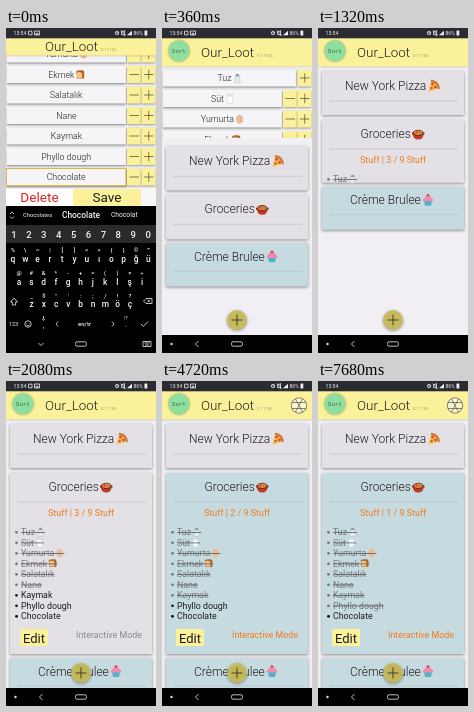
These frames come from a looping animation (150 px wide and 325 px high, 7.76 s). An HTML page:

```html
<!DOCTYPE html>
<html lang="en">
<head>
<meta charset="utf-8">
<title>Shopping list</title>
<style>
html, body { margin: 0; width: 100%; height: 100%; overflow: hidden; background: #f1eff3; }
svg { display: block; width: 100vw; height: 100vh; font-family: Roboto, sans-serif; }
text { fill: #1c1c1e; }
.mid { text-anchor: middle; }
.card { fill: #e3e1e6; filter: drop-shadow(0 1.3px 1.5px rgba(0,0,0,.42)); }
.blue { fill: #c6dbe0; }
.rule { stroke: #b9bbc0; stroke-width: .6; }
.name { font-size: 12px; font-weight: 300; }
.body { font-size: 8.8px; }
.hot { fill: #f07a1e; font-size: 9px; }
.light text { fill: #f4f4f4; }
.line { fill: none; stroke: #eee; stroke-width: .8; }
.yellow { fill: #fcf19b; }
.cell { fill: #f5f4f6; filter: drop-shadow(0 1px 1px rgba(0,0,0,.5)); }
#rows text, #title text { font-weight: 300; }

/* one shared clock: 1% = 77.6 ms */
.a { animation: 7.76s linear infinite; }
.done { fill: #77777c; }

#formClip { animation-name: formClip; }
@keyframes formClip {
  0%, .52% { height: 168px; }
  2.58% { height: 129px; animation-timing-function: ease-in-out; }
  8.8%, 100% { height: 0; }
}
#form { animation-name: form; }
@keyframes form {
  0%, .52% { transform: none; }
  2.58%, 100% { transform: translateY(65px); }
}
#cards { animation-name: cards; }
@keyframes cards {
  0%, .52% { transform: translateY(140px); }
  2.58% { transform: translateY(98px); animation-timing-function: ease-in-out; }
  8.8%, 100% { transform: none; }
}
#view { animation-name: view; }
@keyframes view {
  0%, 3.08% { height: 168px; }
  3.09%, 100% { height: 297px; }
}
#keys { animation-name: keys; }
@keyframes keys {
  0%, 2.06% { transform: none; }
  2.58% { transform: translateY(10px); animation-timing-function: ease-out; }
  5.67%, 100% { transform: translateY(150px); }
}
#head { animation-name: head; }
@keyframes head {
  0%, 3.08% { transform: translateY(-11px); }
  3.09%, 100% { transform: none; }
}
#title { animation-name: title; }
@keyframes title {
  0%, 3.08% { transform: translateY(-6px); }
  3.09%, 100% { transform: none; }
}
#sort { animation-name: sort; }
@keyframes sort {
  0%, 1.03% { opacity: 0; clip-path: inset(16px -3px -3px -3px); }
  2.3% { opacity: 1; }
  3.08% { clip-path: inset(16px -3px -3px -3px); }
  3.09%, 100% { opacity: 1; clip-path: inset(-3px -3px -3px -3px); }
}
#plus { animation-name: plus; }
@keyframes plus {
  0%, 1.03% { opacity: 0; transform: translateY(-127px); }
  2.3% { opacity: 1; transform: translateY(-127px); }
  3.08% { transform: translateY(-127px); }
  3.09%, 100% { opacity: 1; transform: none; }
}
.typing { animation-name: typing; }
@keyframes typing { 0%, 3.08% { opacity: 1; } 3.09%, 100% { opacity: 0; } }
.idle { animation-name: idle; }
@keyframes idle { 0%, 3.08% { opacity: 0; } 3.09%, 100% { opacity: 1; } }

.grow { animation-name: grow; }
@keyframes grow {
  0%, 16.5% { height: 44px; animation-timing-function: ease-out; }
  22.7%, 100% { height: 181px; }
}
#inside { animation-name: inside; }
@keyframes inside { 0%, 16.5% { opacity: 0; } 17%, 100% { opacity: 1; } }
#last { animation-name: last; }
@keyframes last {
  0%, 16.5% { transform: none; animation-timing-function: ease-out; }
  22.7%, 100% { transform: translateY(137px); }
}
#tint { animation-name: grow, tint; }
@keyframes tint {
  0%, 35.57% { fill: #e3e1e6; }
  44.8%, 100% { fill: #c6dbe0; }
}
#mode { animation-name: mode; }
@keyframes mode {
  0%, 35.57% { fill: #8b8b90; }
  44.8%, 100% { fill: #f07a1e; }
}
#badge { animation-name: badge; }
@keyframes badge { 0%, 35.57% { opacity: 0; } 41%, 100% { opacity: 1; } }

.ink6 { animation-name: ink6; }
@keyframes ink6 { 0%, 51% { fill: #1c1c1e; } 55%, 100% { fill: #77777c; } }
.ink7 { animation-name: ink7; }
@keyframes ink7 { 0%, 62.5% { fill: #1c1c1e; } 67%, 100% { fill: #77777c; } }
.cut6 { animation-name: cut6; }
@keyframes cut6 { 0%, 50.99% { opacity: 0; } 51%, 100% { opacity: 1; } }
.cut7 { animation-name: cut7; }
@keyframes cut7 { 0%, 62.49% { opacity: 0; } 62.5%, 100% { opacity: 1; } }
#left3 { animation-name: left3; }
@keyframes left3 { 0%, 50.99% { opacity: 1; } 51%, 100% { opacity: 0; } }
#left2 { animation-name: left2; }
@keyframes left2 { 0%, 50.99% { opacity: 0; } 51%, 62.49% { opacity: 1; } 62.5%, 100% { opacity: 0; } }

#blink { animation-name: blink; }
@keyframes blink {
  0%, 9.8% { opacity: 1; }
  13%, 20.5% { opacity: 0; }
  22.7%, 35.8% { opacity: 1; }
  38%, 46.5% { opacity: 0; }
  49%, 61.5% { opacity: 1; }
  64%, 72% { opacity: 0; }
  75%, 87.2% { opacity: 1; }
  89.6%, 100% { opacity: 0; }
}
</style>
</head>
<body>
<svg viewBox="0 0 150 325" preserveAspectRatio="none">
  <defs>
    <clipPath id="formBox"><rect id="formClip" class="a" y="10" width="150" height="168"/></clipPath>
    <clipPath id="viewBox"><rect id="view" class="a" y="10" width="150" height="168"/></clipPath>
    <clipPath id="bodyBox"><rect class="a grow" y="92" width="150" height="44"/></clipPath>
    <g id="pizza">
      <path d="M4 1Q10 2 12 9L1 12Z" fill="#f7bd4a"/>
      <path d="M3.600 .300Q11.500 1 12.600 9.300L10.800 9.600Q9.500 3.500 3.300 2.400Z" fill="#c9793a"/>
      <g fill="#dd4630"><circle cx="5" cy="4.600" r="1.400"/><circle cx="8" cy="7.600" r="1.400"/><circle cx="4" cy="8.600" r="1.200"/></g>
    </g>
    <g id="pan">
      <path d="M0 4.500H12.500V6.500H0Z" fill="#8a2f25"/>
      <path d="M.8 5.500H11.700Q11.500 11.500 6.200 11.500T.8 5.500Z" fill="#c23b2a"/>
      <ellipse cx="6.200" cy="5" rx="5.300" ry="3.200" fill="#7d2a20"/>
      <ellipse cx="6.200" cy="4.800" rx="4.200" ry="2.200" fill="#e08a3a"/>
      <circle cx="4.500" cy="4.400" r="1.100" fill="#d8402c"/><circle cx="7.800" cy="4.800" r="1" fill="#5f9a45"/>
    </g>
    <g id="cupcake">
      <path d="M2 7H10L9 12H3Z" fill="#4fb3c4"/>
      <path d="M1 7.6Q0 5 3 4Q3 1 6 1T9 4Q12 5 11 7.6Z" fill="#f08bb0"/>
      <circle cx="6" cy="1.4" r="1.2" fill="#d63a45"/>
    </g>
    <g id="salt">
      <path d="M4 4H9L10 12H3Z" fill="#e4ebef" stroke="#a9b5bc" stroke-width=".5"/>
      <path d="M4 4Q4 1 6.5 1T9 4Z" fill="#8f9ba3"/>
    </g>
    <g id="milk">
      <path d="M3 1H10L9 12H4Z" fill="#dfe7ec" stroke="#b7c2c9" stroke-width=".5"/>
      <path d="M3.4 4H9.6L8.8 11.5H4.2Z" fill="#fff"/>
    </g>
    <ellipse id="egg" cx="6" cy="6.5" rx="4.4" ry="5.3" fill="#e8bd97"/>
    <g id="bread">
      <path d="M1 4Q1 1 5 1H9Q12 2 11 5V11H2V6Z" fill="#b06a2e"/>
      <path d="M1.5 4.5Q2 3 5 3T8.4 5V10.4H2.4V6Z" fill="#f2c583"/>
    </g>
  </defs>

  <rect width="150" height="325" fill="#f1eff3"/>

  <g clip-path="url(#viewBox)">
    <g id="cards" class="a">
      <rect class="card" x="4" y="43" width="142" height="44"/>
      <text class="name" x="27" y="62">New York Pizza</text>
      <use href="#pizza" x="109.500" y="51.500"/>
      <path class="rule" d="M11 73H140"/>

      <rect id="tint" class="card a" x="4" y="92" width="142" height="44"/>
      <text class="name" x="42.5" y="110">Groceries</text>
      <use href="#pan" x="94" y="100"/>
      <path class="rule" d="M11 121H140"/>
      <g clip-path="url(#bodyBox)">
        <g id="inside" class="a">
          <text id="left3" class="hot a" x="42" y="135">Stuff | 3 / 9 Stuff</text>
          <text id="left2" class="hot a" x="42" y="135">Stuff | 2 / 9 Stuff</text>
          <text class="hot a cut7" x="42" y="135">Stuff | 1 / 9 Stuff</text>
          <g id="list"></g>
          <rect class="yellow" x="14" y="248" width="28" height="17"/>
          <text x="17" y="261.5" font-size="13">Edit</text>
          <text id="mode" class="a" x="136" y="257" font-size="8.9" text-anchor="end">Interactive Mode</text>
        </g>
      </g>

      <g id="last" class="a">
        <rect class="card blue" x="4" y="140" width="142" height="43"/>
        <text class="name" x="32" y="157.5">Crème Brulee</text>
        <use href="#cupcake" x="104" y="147"/>
        <path class="rule" d="M11 168H140"/>
      </g>
    </g>
  </g>

  <g clip-path="url(#formBox)">
    <rect y="10" width="150" height="168" fill="#f6f5f8"/>
    <g id="form" class="a">
      <g id="rows"></g>
      <rect y="161" width="67" height="17" fill="#fff"/>
      <rect class="yellow" x="67" y="161" width="68" height="17"/>
      <text class="mid" x="33.5" y="174" font-size="13.6" style="fill:#e0261c">Delete</text>
      <text class="mid" x="101" y="174" font-size="13.6">Save</text>
    </g>
  </g>

  <g id="plus" class="a">
    <circle cx="75" cy="292" r="10" fill="#c9bb58" fill-opacity=".92" style="filter:drop-shadow(0 1px 1.5px rgba(0,0,0,.4))"/>
    <path d="M69.5 292H80.5M75 286.5V297.5" stroke="#3b371e" stroke-width=".9"/>
  </g>

  <rect id="head" class="yellow a" y="10" width="150" height="28.5" style="filter:drop-shadow(0 .8px .8px rgba(0,0,0,.3))"/>
  <g id="title" class="a">
    <text x="39" y="29" font-size="13.4">Our_Loot</text>
    <text x="95" y="29" font-size="4.4" style="fill:#8b8250">0.11106</text>
  </g>
  <g id="sort" class="a">
    <circle cx="17" cy="23" r="10.5" fill="#8fdfa0" style="filter:drop-shadow(0 .8px 1px rgba(0,0,0,.4))"/>
    <text class="mid" x="17" y="25" font-size="6" style="font-family:'Liberation Mono',monospace;fill:#3f6b49">Sort</text>
  </g>
  <g id="badge" class="a" fill="none" stroke="#3a382c" stroke-width=".6">
    <circle cx="137" cy="24.5" r="7.7" fill="#fbf6cf"/>
    <path d="M130 21.5H144M130 27.5H144M133.5 18L137 24.5L133.5 31M140.5 18L137 24.5L140.5 31"/>
  </g>

  <g id="keys" class="a light">
    <rect y="178" width="150" height="147"/>
    <rect y="197" width="150" height="18" fill="#2a2a2c"/>
    <path class="line" d="M4 186L6 184L8 186M4 188.500L6 190.500L8 188.500"/>
    <text x="17" y="189" font-size="5.8">Chocolates</text>
    <text class="mid" x="75" y="190" font-size="8.4" font-weight="500">Chocolate</text>
    <text x="105" y="189.300" font-size="6.700">Chocolat</text>
    <g id="letters" font-weight="500"></g>
    <path class="line" d="M4.500 274L8 270L11.500 274H9.700V277H6.300V274ZM137.500 273L140 270.500H146V275.500H140ZM141.500 271.700L144 274.300M144 271.700L141.500 274.300"/>
    <text class="mid" x="7.500" y="298" font-size="5.6">123</text>
    <circle class="line" cx="22" cy="296" r="3.200"/>
    <path class="line" d="M20.500 297Q22 299 23.500 297M20.800 295V295.500M23.200 295V295.500M37.500 288V291M36 291Q37.500 293.500 39 291M52 293.500L50 296L52 298.500M106 293.500L108 296L106 298.500M135 296L137.300 298.500L142 293.500"/>
    <text class="mid" x="37.500" y="300" font-size="8">,</text>
    <text class="mid" x="78.500" y="298" font-size="6" font-weight="500">en/tr</text>
    <text class="mid" x="120" y="299" font-size="8">.</text>
    <text class="mid" x="120" y="292" font-size="4.500">!?</text>
  </g>

  <g class="light">
    <rect y="307" width="150" height="18"/>
    <circle cx="9.500" cy="316" r="1.200" fill="#ddd" class="a idle"/>
    <path class="line a typing" d="M32.500 315L35 317.500L37.500 315M137 313.500H145V318.500H137ZM138.500 315H143.500M139 317H143"/>
    <path class="line a idle" d="M36.500 313L33.500 316L36.500 319"/>
    <rect class="line" x="69.500" y="313.800" width="11" height="4.400" rx="1.600"/>

    <rect width="150" height="10.300" fill="#2b2b32"/>
    <text x="7.500" y="6.900" font-size="5.200">13:54</text>
    <g id="blink" class="a">
      <path class="line" d="M22.500 3.200H26V6.800H22.500ZM28.500 3H33.500V7H28.500Z"/>
      <path d="M29 6.500L31 4.500L33 6.500Z" fill="#eee"/>
    </g>
    <circle class="line" cx="111" cy="5" r="1.700"/>
    <path class="line" d="M111 4V5H112M115.500 3.500H117L118.500 2.500V7.500L117 6.500H115.500ZM115 2.500L119.500 7.500"/>
    <path d="M121 7.300H126V2.800Z" fill="#eee"/>
    <text x="127.500" y="6.900" font-size="5">86%</text>
    <rect x="138.500" y="2.600" width="2.800" height="4.800" rx=".5" fill="#eee"/>
  </g>
</svg>

<script>
const $ = id => document.getElementById(id);
const pen = document.createElement('canvas').getContext('2d');
pen.font = '88px Roboto, sans-serif';
const widthOf = s => pen.measureText(s).width / 10;
const icon = (id, x, y, k) =>
  id ? `<use href="#${id}" transform="translate(${x} ${y}) scale(${k})"/>` : '';

const items = [
  ['Tuz', 'salt'], ['Süt', 'milk'], ['Yumurta', 'egg'], ['Ekmek', 'bread'],
  ['Salatalık'], ['Nane'], ['Kaymak'], ['Phyllo dough'], ['Chocolate']
];

$('list').innerHTML = items.map(([name, pic], i) => {
  const y = 151 + i * 10.5;
  const w = widthOf(name) + (pic ? 10 : 0);
  const ink = i < 6 ? 'done' : i < 8 ? `a ink${i}` : '';
  const cut = i < 6 ? '' : `a cut${i}`;
  const strike = i < 8
    ? `<rect class="${cut}" x="15" y="${y}" width="${w}" height=".8" fill="#5c5c60"/>` : '';
  return `<circle class="${ink}" cx="10.5" cy="${y + .3}" r="1.4"/>
    <text class="body ${ink}" x="15" y="${y + 3.1}">${name}</text>
    ${icon(pic, 15.5 + widthOf(name), y - 5, .78)}${strike}`;
}).join('');

const sign = (x, y, plus) =>
  `<rect class="yellow" x="${x}" y="${y - 8.5}" width="14" height="17" style="filter:drop-shadow(0 1px 1px rgba(0,0,0,.4))"/>
   <path d="M${x + 2.5} ${y}h9.5${plus ? `M${x + 7.25} ${y - 4.75}v9.5` : ''}" stroke="#4a4630" stroke-width=".7"/>`;

const row = ([name, pic], i) => {
  const y = 149 - 20.5 * (8 - i);
  const wide = i ? 120 : 134;
  const w = widthOf(name) + (pic ? 10 : 0);
  const x = wide / 2 + .5 - w / 2;
  const edge = i === 8 ? 'stroke="#e0b64a" stroke-width="1"' : '';
  return `<rect class="cell" x=".5" y="${y - 8.5}" width="${wide - .5}" height="17" ${edge}/>
    <text class="body" x="${x}" y="${y + 3.1}">${name}</text>
    ${icon(pic, x + widthOf(name) + .5, y - 5, .82)}
    ${i ? sign(121, y) : ''}${sign(135.5, y, true)}`;
};
$('rows').innerHTML =
  '<text class="body mid" x="67" y="-33">Stuff</text>' + items.map(row).join('');

const esc = c => c.replace('&', '&amp;').replace('<', '&lt;');
const keyRow = (chars, x, step, y, size) => [...chars].map((c, i) =>
  `<text class="mid" x="${x + i * step}" y="${y}" font-size="${size}">${esc(c)}</text>`).join('');
$('letters').innerHTML = [
  ['1234567890', 8, 14.9, 209.5, 9.5],
  ['%\\~|[]<>{}©™', 7, 12.3, 224, 5.8],
  ['qwertyuıopğü', 7, 12.3, 233.5, 8.4],
  ['@#&*-+=()×÷', 13, 12.3, 246.5, 5.8],
  ['asdfghjklşi', 13, 12.3, 256.5, 8.4],
  ['_$"\':;/!?', 25.5, 12.3, 269.5, 5.8],
  ['zxcvbnmöç', 25.5, 12.3, 279, 8.4]
].map(r => keyRow(...r)).join('');
</script>
</body>
</html>
```
